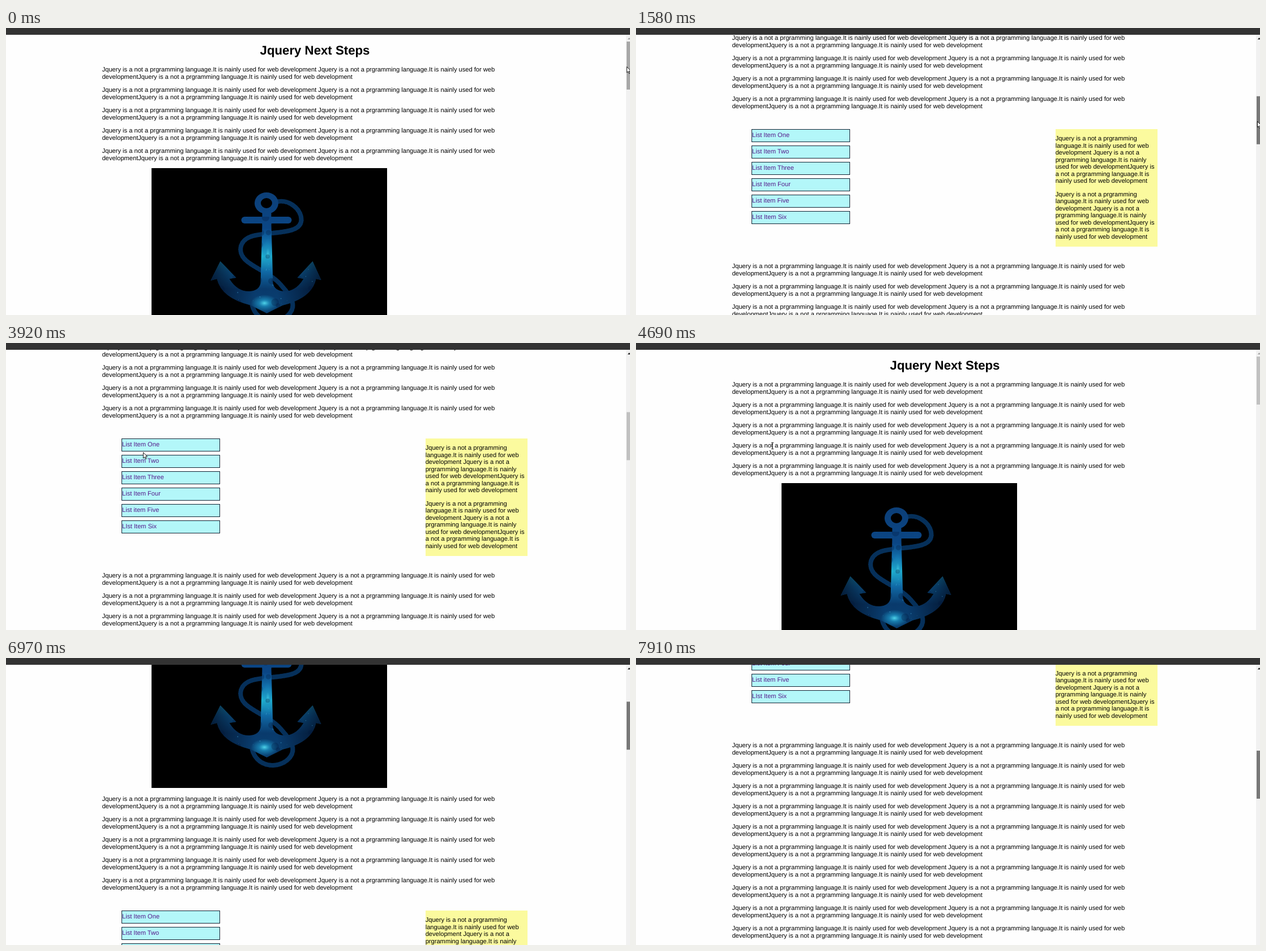
An HTML page that plays this animation: 1102 px wide and 508 px high, repeating every 8 s.

```html
<!DOCTYPE html>
<html lang="en">
<head>
<meta charset="utf-8">
<title>Jquery Next Steps</title>
<style>
  html, body { margin: 0; width: 100%; height: 100%; overflow: hidden; background: #fefefe; }
  #stage {
    position: relative; width: 1102px; height: 508px; overflow: hidden; background: #fefefe;
    font: 11.11px/12.5px "Liberation Sans", Arial, sans-serif; color: #000;
    text-rendering: geometricPrecision; white-space: pre;
  }
  #page, #page > *, #bar, #track, #thumb, #stage > svg { position: absolute; }
  #page { left: 0; top: 0; width: 1095px; height: 1700px; will-change: transform; }
  h1 { margin: 0; left: 0; top: 27px; width: 1091px; text-align: center; font-size: 22.22px; line-height: 25px; }
  p { margin: 0; left: 169.7px; }
  .item {
    left: 204px; width: 174px; height: 23px; box-sizing: border-box; padding-top: 4px;
    border: 1px solid #123; background: #b3f7f9; color: #551a8b;
  }
  .item.active { color: #f00; }
  #note { left: 740.5px; top: 776px; width: 180.5px; height: 208px; background: #fbfa9e; }
  #note p { position: absolute; left: 0.2px; }
  #photo { left: 256.5px; top: 248px; }
  #bar { left: 0; top: 0; width: 1102px; height: 12px; background: #333; }
  #track { left: 1095px; top: 12px; width: 7px; height: 496px; background: #f1f1f1; }
  #thumb { left: 1096px; top: 24px; width: 6px; height: 85px; }
  #stage > svg { left: 0; top: 0; overflow: visible; }
</style>
</head>
<body>
<div id="stage">
  <div id="page">
    <h1>Jquery Next Steps</h1>
    <svg id="photo" width="416" height="311" viewBox="256.5 248 416 311">
      <defs>
        <linearGradient id="steel" gradientUnits="userSpaceOnUse" x1="0" y1="290" x2="0" y2="505">
          <stop offset="0" stop-color="#0c3f78"/>
          <stop offset=".3" stop-color="#0b4685"/>
          <stop offset=".42" stop-color="#1272ae"/>
          <stop offset=".53" stop-color="#1fb0d0"/>
          <stop offset=".66" stop-color="#1068a4"/>
          <stop offset=".8" stop-color="#093a6c"/>
          <stop offset="1" stop-color="#0a4273"/>
        </linearGradient>
        <linearGradient id="shade" gradientUnits="userSpaceOnUse" x1="361" y1="0" x2="557" y2="0">
          <stop offset="0" stop-color="#020d22" stop-opacity=".8"/>
          <stop offset=".4" stop-color="#020d22" stop-opacity="0"/>
          <stop offset=".6" stop-color="#020d22" stop-opacity="0"/>
          <stop offset="1" stop-color="#020d22" stop-opacity=".8"/>
        </linearGradient>
        <radialGradient id="glow">
          <stop offset="0" stop-color="#4fd4ea"/>
          <stop offset=".4" stop-color="#1c8fc0" stop-opacity=".75"/>
          <stop offset="1" stop-color="#1c8fc0" stop-opacity="0"/>
        </radialGradient>
        <path id="arms" d="M378 413L406 442L394 444Q408 467 430 466Q446 465 449 452L452 346H468L471 452Q474 465 490 466Q511 467 525 444L514 442L541 413L556 446L547 444Q540 478 488 491L460 505L432 491Q380 478 372 444L361 447Z"/>
        <clipPath id="inside"><use href="#arms"/><path d="M415 334H504V346H415Z"/></clipPath>
      </defs>
      <rect x="256" y="248" width="418" height="312"/>
      <g id="rope" fill="none">
        <path id="line" stroke="#06305a" stroke-width="8" d="M474 309C496 300 522 320 521 340C520 364 478 360 440 367C412 372 406 396 424 412C440 426 470 436 486 456C504 476 514 492 498 508C480 526 442 523 434 490"/>
        <use href="#line" style="stroke:#010812"/>
      </g>
      <g fill="url(#steel)">
        <path fill-rule="evenodd" d="M438.500 310a21 19 0 1 1 42 0a21 19 0 1 1-42 0M449.500 310a10 9 0 1 0 20 0a10 9 0 1 0-20 0"/>
        <path d="M452 326H468V348H452Z"/>
        <rect x="415" y="334" width="89" height="12" rx="6"/>
        <use href="#arms"/>
      </g>
      <use href="#arms" fill="url(#shade)"/>
      <g id="stars" clip-path="url(#inside)">
        <ellipse cx="456" cy="487" rx="24" ry="15" fill="url(#glow)"/>
        <ellipse cx="462" cy="400" rx="9" ry="28" fill="url(#glow)" opacity=".55"/>
      </g>
    </svg>
    <div id="note"></div>
  </div>
  <div id="bar"></div>
  <div id="track"></div>
  <div id="thumb"></div>
  <svg width="1102" height="508">
    <path id="up" d="M1097.800 20.200L1100.500 17L1103.200 20.200Z"/>
    <g id="cursor" fill="#fff" stroke="#000" stroke-width=".9" stroke-linejoin="round">
      <path data-kind="arrow" d="M.4.600V11L2.800 8.800L4.400 12.600L6 11.900L4.400 8.200H7.600Z"/>
      <path data-kind="hand" d="M-1 1Q0-.4 1 1V5.500L6 6.500Q7 7 7 8V11L5.500 14H-1L-4.300 9Q-4.500 7.300-3 7.700L-1 9.500Z"/>
      <path data-kind="beam" fill="none" d="M-2-5.500H2M0-5.500V5.500M-2 5.500H2"/>
    </g>
  </svg>
</div>
<script>
const $ = id => document.getElementById(id);
const LOOP = 8000;
const base = 'Jquery is a not a prgramming language.It is nainly used for web';
const wide = `${base} development ${base}\ndevelopmentJquery is a not a prgramming language.It is nainly used for web development`;
const narrow = `Jquery is a not a prgramming
language.It is nainly used for web
development Jquery is a not a
prgramming language.It is nainly
used for web developmentJquery is
a not a prgramming language.It is
nainly used for web development`;

function add(parent, tag, top, text, cls = '') {
  const el = document.createElement(tag);
  el.className = cls;
  el.style.top = top + 'px';
  el.textContent = text;
  return parent.appendChild(el);
}
function paragraphs(top, count) {
  for (let i = 0; i < count; i++) add($('page'), 'p', top + i * 36, wide);
}
paragraphs(68, 5);
paragraphs(573, 5);
paragraphs(1013, 16);
add($('note'), 'p', 11, narrow);
add($('note'), 'p', 109.5, narrow);
const items = ['List Item One', 'List Item Two', 'List Item Three', 'List Item Four', 'List item Five', 'LIst Item Six']
  .map((text, i) => add($('page'), 'div', 776 + i * 29, text, 'item'));

// rope strands and speckles
$('rope').lastElementChild.setAttribute('stroke-dasharray', '1.5 5');
let seed = 7;
const rnd = () => (seed = seed * 16807 % 2147483647) / 2147483647;
for (let i = 0; i < 90; i++) {
  const c = document.createElementNS('http://www.w3.org/2000/svg', 'circle');
  const big = i % 3 === 0;
  c.setAttribute('cx', 365 + rnd() * 190);
  c.setAttribute('cy', 335 + rnd() * 165);
  c.setAttribute('r', big ? 3 + rnd() * 4 : 0.4 + rnd() * 0.6);
  c.setAttribute('fill', big ? '#03183a' : '#3f9ed0');
  c.setAttribute('opacity', big ? 0.28 : 0.5);
  $('stars').append(c);
}

// [time, scroll offset]
const scrolls = [
  [0, 0], [1180, 60], [1260, 212], [1330, 376], [1430, 475], [1500, 550], [1580, 597],
  [2270, 586], [2440, 590], [2820, 594], [2890, 607], [4690, 0],
  [6760, 45], [6830, 125], [6900, 228], [6970, 329], [7040, 425], [7120, 508], [7200, 570], [7280, 612],
  [7450, 650], [7530, 700], [7600, 748], [7680, 790], [7830, 832], [7910, 864]
];
// [time, x, y]; without y the pointer drags the thumb, without x it is off stage
const moves = [
  [0, 1096, 68], [840, 1098, 68], [1180, 1095], [1330, 1093], [1430, 1095], [1580, 1097], [2820, 1098],
  [3140, 900, 165], [3210, 600, 150], [3280, 360, 136],
  [3510, 334, 168], [3590, 302, 212], [3670, 276, 238], [3750, 257, 236], [3830, 247, 214],
  [3920, 242, 193], [4000, 241, 191], [4090, 241, 189], [4170, 241, 188], [4260, 241, 186], [4320, 241, 182],
  [5090, 420, 190], [5170, 720, 245], [5250, 927, 284],
  [5470, 1040, 215], [5570], [5790, 1093, 80],
  [5970, 1092, 80], [6040, 1095, 80], [6110, 1097, 79], [6180, 1098, 79], [6350]
];
const IDLE = '#c1c1c1', HOVER = '#a8a8a8', DRAG = '#787878';
const thumbs = [[0, HOVER], [1180, DRAG], [3140, IDLE], [6110, HOVER], [6570, DRAG]];

const at = (list, t) => list.findLast(step => step[0] <= t);

function pointerKind(t, x, y, scroll) {
  if (t >= 4690 && t < 5090) return 'beam';
  const row = y + scroll - 776;
  const onItem = x >= 204 && x < 378 && row >= 0 && row < 174 && row % 29 < 23;
  return onItem ? 'hand' : 'arrow';
}

function draw(now) {
  const t = now % LOOP;
  const scroll = at(scrolls, t)[1];
  const shift = scroll / 6.17;
  $('page').style.transform = `translateY(${-scroll}px)`;
  $('thumb').style.transform = `translateY(${shift}px)`;
  $('thumb').style.background = at(thumbs, t)[1];
  $('up').setAttribute('fill', scroll ? '#222' : '#a3a3a3');
  items[0].classList.toggle('active', t >= 4540 && t < 4690);

  const [, x, y = 68 + shift] = at(moves, t);
  const kind = x === undefined ? '' : pointerKind(t, x, y, scroll);
  for (const shape of $('cursor').children) shape.style.display = shape.dataset.kind === kind ? '' : 'none';
  if (kind) $('cursor').setAttribute('transform', `translate(${x} ${y})`);
}

const start = performance.now();
function tick() {
  draw(performance.now() - start);
  requestAnimationFrame(tick);
}
tick();
</script>
</body>
</html>
```
